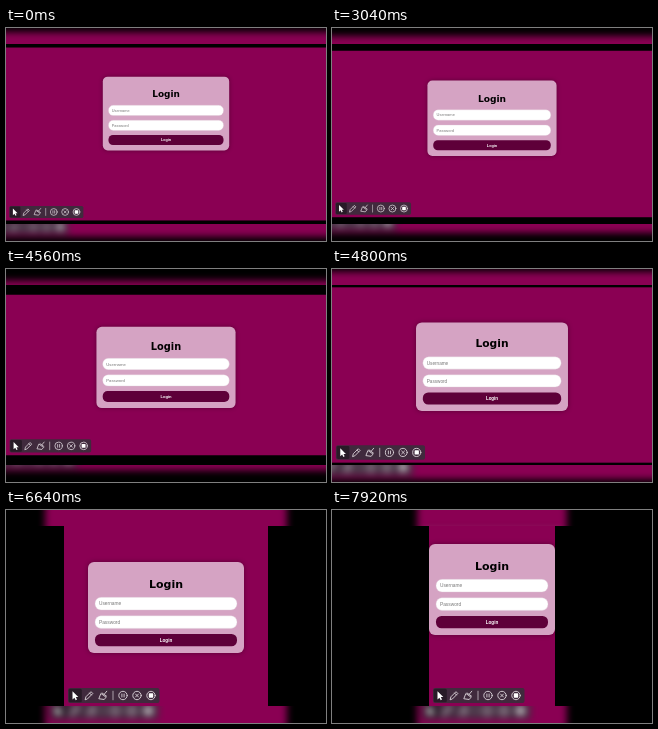
Write an HTML page that moves like this. It is 320 by 213 pixels and loops after 8000 ms.

```html
<!DOCTYPE html>
<html lang="en">
<head>
<meta charset="utf-8">
<title>Responsive login</title>
<style>
  html, body { margin: 0; width: 100%; height: 100%; overflow: hidden; background: #000; }
  svg { display: block; width: 100vw; height: 100vh; }
  .page { fill: #8a0053; }
  .card { fill: #d5a3c3; filter: drop-shadow(0 0 2.5px rgba(0, 0, 0, .35)); }
  .field { fill: #fff; stroke: #d9c3d1; stroke-width: .4; }
  .button { fill: #5e0039; }
  .title { font: bold 11px "DejaVu Sans", sans-serif; text-anchor: middle; }
  .hint { font: 4.8px "Liberation Sans", sans-serif; fill: #777; }
  .action { font: bold 4.6px "Liberation Sans", sans-serif; fill: #fff; text-anchor: middle; }
  .icon { fill: none; stroke: #ddd5db; stroke-width: .9; stroke-linejoin: round; stroke-linecap: round; }
  .solid { fill: #fff; stroke: none; }
</style>
</head>
<body>
<svg viewBox="0 0 320 213" preserveAspectRatio="none">
  <defs>
    <filter id="blur" filterUnits="userSpaceOnUse" x="-60" y="-60" width="440" height="333" color-interpolation-filters="sRGB">
      <feGaussianBlur stdDeviation="3.6"/>
    </filter>
    <g id="window">
      <rect id="page" class="page"/>
      <g id="card">
        <rect class="card wide" height="91" rx="6"/>
        <text class="title middle" y="25.5">Login</text>
        <rect class="field inset" x="7" y="35.3" height="12.7" rx="6"/>
        <text class="hint" x="11" y="43.4">Username</text>
        <rect class="field inset" x="7" y="53.7" height="12.7" rx="6"/>
        <text class="hint" x="11" y="61.8">Password</text>
        <rect class="button inset" x="7" y="72" height="12.3" rx="5.5"/>
        <text class="action middle" y="79.8">Login</text>
      </g>
      <g id="tools">
        <rect width="91.5" height="15" rx="2" fill="#402a3d"/>
        <rect x=".8" y=".8" width="13" height="13.4" rx="1.5" fill="#281b27"/>
        <g class="icon">
          <path class="solid" d="M4.5 3.2V11.4L6.4 9.7L7.7 12.2L9 11.5L7.8 9.1H10.3Z"/>
          <path d="M17.2 11.4L17.9 8.8L23 3.7L24.8 5.5L19.7 10.7ZM21.6 5.1L23.4 6.9"/>
          <path d="M38.8 3.2L36.2 6.3M33.2 5.7L38.1 9.2L36.2 11.5L31.2 10.8ZM34.1 5L38.6 8.2"/>
          <path d="M45 3.2V11.8" stroke-width=".7"/>
          <circle cx="55" cy="7.5" r="4.2"/>
          <path d="M53.9 6V9M56.1 6V9"/>
          <circle cx="69" cy="7.5" r="4.2"/>
          <path d="M67.5 6L70.5 9M70.5 6L67.5 9"/>
          <circle cx="83" cy="7.5" r="4.2"/>
          <rect class="solid" x="80.8" y="5.3" width="4.4" height="4.4" rx=".6"/>
        </g>
      </g>
    </g>
  </defs>
  <rect width="320" height="213"/>
  <g filter="url(#blur)">
    <rect id="bleed" class="page" y="-40" height="293"/>
    <use href="#window" transform="translate(160 106.5) scale(1.183) translate(-160 -106)"/>
  </g>
  <rect y="16" width="320" height="180"/>
  <use href="#window"/>
</svg>
<script>
  const LOOP = 8000, STEP = 80;
  const MAX_CARD = 156, NARROW = 187;

  // time, window width, window height
  const sizes = [
    [0, 395, 213.5], [2720, 395, 213.5], [3600, 372, 179.5],
    [3760, 372, 179.5], [4160, 369, 180], [4480, 369, 180],
    [4800, 328.5, 180], [5120, 262, 180], [5360, 262, 180],
    [5600, 236, 180], [6240, 213, 180], [6640, 204, 180],
    [7120, 184, 180], [7200, 184, 180], [7920, 126, 180]
  ];

  const byId = id => document.getElementById(id);
  const [page, card, tools, bleed, frame] = ["page", "card", "tools", "bleed", "window"].map(byId);

  function set(node, attributes) {
    for (const name in attributes) node.setAttribute(name, attributes[name]);
  }

  function setAll(selector, attributes) {
    document.querySelectorAll(selector).forEach(node => set(node, attributes));
  }

  function sizeAt(time) {
    const next = sizes.findIndex(key => key[0] > time);
    if (next < 0) return sizes[sizes.length - 1].slice(1);
    const [from, to] = [sizes[next - 1], sizes[next]];
    const part = (time - from[0]) / (to[0] - from[0]);
    return [1, 2].map(i => from[i] + (to[i] - from[i]) * part);
  }

  function draw(time) {
    const [width, height] = sizeAt(Math.floor(time / STEP) * STEP);
    const scale = Math.min(320 / width, 180 / height);
    const left = 160 - width * scale / 2;
    const top = 106 - height * scale / 2;
    const cardWidth = Math.min(MAX_CARD, width);
    const cardTop = width < NARROW ? 18 : 36;

    set(frame, { transform: `translate(${left} ${top}) scale(${scale})` });
    set(page, { width, height });
    set(card, { transform: `translate(${(width - cardWidth) / 2} ${cardTop})` });
    set(tools, { transform: `translate(4 ${height - 18})` });
    setAll(".wide", { width: cardWidth });
    setAll(".inset", { width: cardWidth - 14 });
    setAll(".middle", { x: cardWidth / 2 });

    // A full-height window runs past the stage, so its blur keeps its colour at the edge.
    const bleedWidth = height * scale > 179.5 ? width * scale * 1.183 : 0;
    set(bleed, { x: 160 - bleedWidth / 2, width: bleedWidth });
  }

  const start = performance.now();
  function tick() {
    draw((performance.now() - start) % LOOP);
    requestAnimationFrame(tick);
  }
  tick();
</script>
</body>
</html>
```
